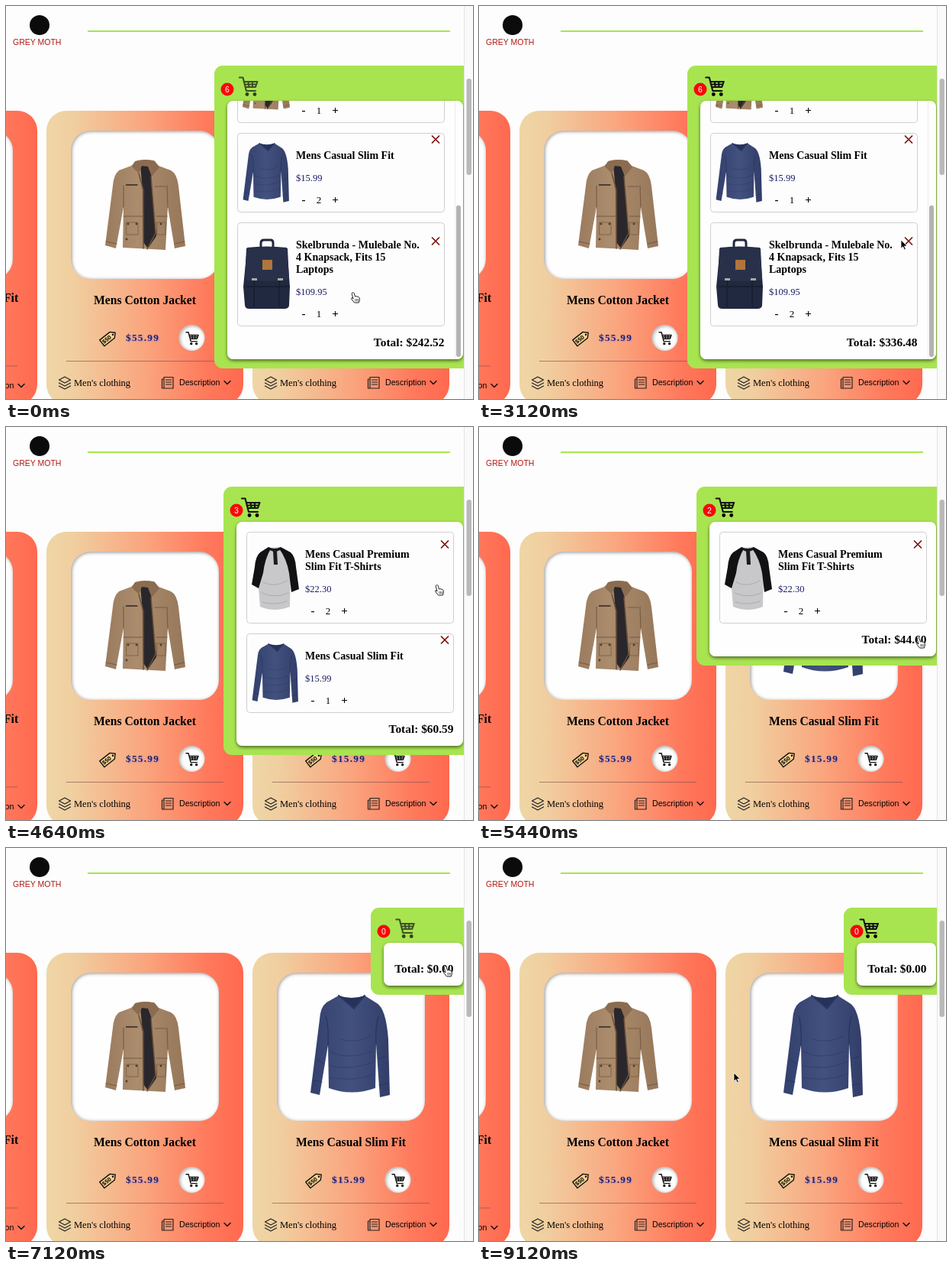
Animation, 612 px wide and 514 px high, one loop 9200 ms. Source, as an HTML page:

```html
<!DOCTYPE html>
<html lang="en">
<head>
<meta charset="utf-8">
<title>Shopping cart</title>
<style>
html, body { margin: 0; width: 100%; height: 100%; overflow: hidden; background: #fdfdfd; }
svg { display: block; width: 612px; height: 514px; }
text { font-family: "Liberation Serif", "Times New Roman", serif; white-space: pre; }
.sans { font-family: "Liberation Sans", Arial, sans-serif; }
.b { font-weight: bold; }
.line { fill: none; stroke: #111; stroke-linecap: round; stroke-linejoin: round; }
</style>
</head>
<body>
<svg id="stage" viewBox="0 0 612 514" xmlns="http://www.w3.org/2000/svg"></svg>
<script>
const LOOP = 9200, STEP = 80;
const stage = document.getElementById('stage');

const text = (x, y, size, str, cls = '', extra = '') =>
  `<text x="${x}" y="${y}" font-size="${size}" class="${cls}" ${extra}>${str}</text>`;
const path = (d, fill, extra = '') => `<path d="${d}" fill="${fill}" ${extra}/>`;
const line = (d, color, width, extra = '') =>
  `<path d="${d}" class="line" style="stroke:${color};stroke-width:${width}" ${extra}/>`;
const use = (id, x, y, scale = 1) =>
  `<use href="#${id}" transform="translate(${x} ${y}) scale(${scale})"/>`;

const shirt =
  path('M38 1L22 10Q14 16 13 32L1 128L13 131L24 66L25 122Q55 133 86 122L87 64L92 134L105 131L103 58Q100 18 88 11L72 1Q55 9 38 1z', 'url(#navy)') +
  path('M38 1Q55 7 72 1L58 18z', '#26325a') +
  line('M38 1L58 18L72 1', '#2b3764', 2) +
  line('M24 66Q25 40 21 28M87 64Q86 40 90 28', '#293560', 1.3) +
  line('M27 74Q48 86 82 74M26 92Q50 100 84 88M27 108Q56 114 84 104M40 58Q60 64 80 54', '#2f3b67', 1.2, 'opacity=".7"') +
  line('M5 112L16 114M91 118L103 116M9 84L18 90M90 84L101 80', '#2a3661', 1);

const jacket =
  path('M40 2L34 8L18 14Q11 20 10 34L0 112L14 116L24 62L23 115L79 118L82 62L91 116L105 113L96 34Q94 18 86 14L70 8L64 1Q52 -1 40 2z', 'url(#tan)') +
  path('M46 7L62 8L60 26L67 100L56 116L50 108L49 40z', '#29272c') +
  path('M39 2Q52 -2 65 2L71 10L61 22L56 9L48 8L44 18L35 9z', '#8c6c50') +
  line('M44 18L50 40L50 116M60 22L66 96L55 117', '#6c503a', 1.5) +
  line('M24 62L24 34M82 62L81 34M1 107L15 110M91 110L104 107M28 33H43M65 35H79M24 74H49M67 74H81', '#765a42', 1.1) +
  line('M28 82H43V98H28zM68 82H79V98H68z', '#806247', 1) +
  path('M27 32h15v2h-15z', '#4b3e35') +
  [[30, 84], [41, 84], [28, 104], [73, 84]].map(([x, y]) => `<circle cx="${x}" cy="${y}" r="1.4" fill="#4d3b2d"/>`).join('');

const tee =
  path('M22 3L14 10L12 34L9 56L11 80Q30 88 50 80L51 34L48 10L38 2z', '#c8c8cb') +
  path('M22 2L11 9Q5 14 4 28L0 51L9 56L15 36Q17 18 25 4zM38 2L51 9Q57 14 58 28L62 57L52 61L49 36Q46 18 36 4z', '#121214') +
  path('M22 2Q30 6 38 2L37 6Q30 10 24 6zM28 7h5l1 18h-5z', '#1b1b1e') +
  line('M15 48Q30 56 46 46M13 62Q30 70 48 62M14 74Q30 79 46 73', '#a9a9ad', .9);

const pack =
  line('M23 12V5Q23 1 27 1H36Q39 1 39 5V12', '#20283e', 3) +
  path('M5 11Q30 8 57 11L61 62L60 87Q59 91 54 91H8Q2 91 2 86L0 62z', '#20293f') +
  path('M4 12Q30 9 58 12L60 53Q30 57 2 53z', '#283149') +
  line('M14 54V88M47 54V88M3 62H60', '#161d2f', 1.3) +
  path('M11 51h7v3h-7zM45 51h7v3h-7z', '#a8a9a8') +
  '<rect x="25" y="27" width="13" height="13" fill="#b0763c"/>';

const cartIcon =
  '<path d="M1.5 2.5H6L10.5 20H22.5M7.5 8H25L22.5 15H9.3M8 11.5H23.5M13 8L14 15M18.5 8V15" class="line" stroke-width="2.1"/>' +
  '<circle cx="11.5" cy="24.5" r="2.4"/><circle cx="21.5" cy="24.5" r="2.4"/>';

const defs = `<defs>
<linearGradient id="peach"><stop offset="0" stop-color="#efd6a6"/><stop offset=".13" stop-color="#f0cfa0"/>
<stop offset=".5" stop-color="#faa57e"/><stop offset=".82" stop-color="#ff795c"/><stop offset="1" stop-color="#ff694f"/></linearGradient>
<linearGradient id="navy"><stop offset="0" stop-color="#33406e"/><stop offset=".5" stop-color="#43517f"/><stop offset="1" stop-color="#323e69"/></linearGradient>
<linearGradient id="tan"><stop offset="0" stop-color="#9b7b5e"/><stop offset=".4" stop-color="#ab8c6d"/><stop offset="1" stop-color="#967759"/></linearGradient>
<filter id="soft" x="-20%" y="-20%" width="140%" height="140%"><feGaussianBlur stdDeviation="2.2"/></filter>
<filter id="drop" x="-20%" y="-20%" width="140%" height="150%"><feDropShadow dx="0" dy="2" stdDeviation="2" flood-opacity=".55"/></filter>
<clipPath id="photo"><rect x="85" y="163" width="194" height="194" rx="26"/></clipPath>
<clipPath id="knob"><circle cx="243.5" cy="434" r="17"/></clipPath>
<clipPath id="page"><rect width="600" height="514"/></clipPath>
<g id="shirt">${shirt}</g><g id="jacket">${jacket}</g><g id="tee">${tee}</g><g id="pack">${pack}</g>
<g id="cart">${cartIcon}</g>
<g id="tag"><path d="M-11 -5H6L11 0L6 5H-11z" class="line" style="fill:#f7d08c" stroke-width="1.4"/>
<circle cx="7" cy="0" r="1.2"/>${text(-9.5, 2.6, 7.5, '$50', 'sans b')}</g>
</defs>`;

// Shop cards are laid out in the middle card's coordinates and shifted.
function card(dx, title, price, pic, shift = 0) {
  return `<g transform="translate(${dx} 0)">
<rect x="53" y="137" width="258" height="384" rx="26" fill="url(#peach)"/>
<g clip-path="url(#photo)"><rect x="85" y="163" width="194" height="194" fill="#fefefe"/>
<rect x="84" y="162" width="198" height="198" rx="27" fill="none" stroke="#333" stroke-opacity=".6" stroke-width="4" filter="url(#soft)"/></g>
${pic}${title}
<g transform="translate(134.5 434) rotate(-38)"><use href="#tag"/></g>
${text(157, 438, 13.2, price, 'b', 'fill="#1c2266" letter-spacing="1.3" style="text-shadow:1px 1px 2px #b58ac8"')}
<circle cx="243.5" cy="434" r="17" fill="#fefefe"/>
<g clip-path="url(#knob)"><circle cx="244.5" cy="435" r="18.5" fill="none" stroke="#333" stroke-opacity=".6" stroke-width="3" filter="url(#soft)"/></g>
${use('cart', 235, 425, .68)}
<path d="M79 ${464.5 + shift * 1.6}H285" stroke="#7a4a48" stroke-opacity=".6"/>
<g transform="translate(0 ${shift})">
${line('M69.5 489L77 485L84.5 489L77 493zM69.5 493L77 497L84.5 493M69.5 497L77 501L84.5 497', '#222', 1.2)}
${text(89, 497, 12.5, "Men's clothing")}
${line('M207 485.5H219V500H207zM207 488H204.5V500H207M209.5 489H216.5M209.5 492H216.5M209.5 495H216.5', '#222', 1.2)}
${text(227, 496, 10.67, 'Description', 'sans')}
${line('M286 490.5L290 494.5L294 490.5', '#111', 1.5)}
</g></g>`;
}

const heading = str => text(182, 390, 15.67, str, 'b', 'text-anchor="middle"');

const hand = path('M2 1Q3.5 0 4.2 1.6L5.4 6L7 5.6L8.4 6.1L10 6.4L11.3 8V11L10.3 14H4.5L1 9.5Q0 8 1 7.6L3 8.8L1.2 2.6Q1 1.4 2 1z', '#fff',
  'stroke="#222" stroke-width="1" stroke-linejoin="round"') + line('M5.8 9.4V12M7.6 9.4V12M9.3 9.4V12', '#222', .7);
const arrow = path('M0 0V11.2L2.6 8.8L4.4 12.8L6.3 12L4.5 8.1H8z', '#000', 'stroke="#fff" stroke-width=".8"');

stage.innerHTML = defs + `
<rect width="612" height="514" fill="#fdfdfd"/>
<circle cx="44" cy="25" r="13" fill="#0b0b0b"/>
${text(9, 51, 10.5, 'GREY MOTH', 'sans', 'fill="#b01a12"')}
<path d="M107 33H582" stroke="#a5e84b" stroke-width="2"/>
<g clip-path="url(#page)">
${card(-270, text(267, 387, 15.67, 'Fit', 'b'), '$22.30', '', 4)}
${card(0, heading('Mens Cotton Jacket'), '$55.99', use('jacket', 130, 201))}
${card(270, heading('Mens Casual Slim Fit'), '$15.99', use('shirt', 128, 192))}
<g id="panel"></g>
</g>
<rect x="600" width="12" height="514" fill="#fafafa"/>
<path d="M600.5 0V514" stroke="#e4e4e4"/>
<rect x="603.5" y="95" width="6.5" height="126" rx="3.2" fill="#b9b9b9"/>
<g id="pointer"><g id="hand">${hand}</g><g id="arrow">${arrow}</g></g>`;

const goods = [
  { name: ['Mens Casual Premium', 'Slim Fit T-Shirts'], price: 22.30, pic: y => use('tee', 7, y + 18) },
  { name: ['Mens Cotton Jacket'], price: 55.99, pic: y => use('jacket', 7, y + 17, .59) },
  { name: ['Mens Casual Slim Fit'], price: 15.99, pic: y => use('shirt', 7, y + 13, .58) },
  { name: ['Skelbrunda - Mulebale No.', '4 Knapsack, Fits 15', 'Laptops'], price: 109.95, pic: y => use('pack', 8, y + 22) }
];

// Quantities per product from a given time on.
const changes = [
  [0, [2, 1, 2, 1]], [960, [2, 1, 2, 2]], [2480, [2, 1, 1, 2]], [3520, [2, 1, 1, 0]],
  [4320, [2, 0, 1, 0]], [5440, [2, 0, 0, 0]], [6640, [0, 0, 0, 0]]
];

const height = item => 88 + 16 * item.name.length;

function row(item, qty, y) {
  const n = item.name.length, shift = 16 * (n - 1), cross = y + 8.5 + 8 * (n - 1);
  return `<rect x=".5" y="${y + .5}" width="271" height="${height(item) - 1}" rx="4" fill="#fdfdfd" stroke="#cfcfcf"/>` +
    item.pic(y) +
    item.name.map((s, i) => text(77, y + 33.5 + 16 * i, 14, s, 'b')).join('') +
    text(77, y + 62.5 + shift, 12.5, '$' + item.price.toFixed(2), '', 'fill="#1b1b68"') +
    text(87, y + 91.5 + shift, 15, '-', 'b', 'text-anchor="middle"') +
    text(107, y + 91.5 + shift, 13, qty, '', 'text-anchor="middle"') +
    text(128.5, y + 92 + shift, 15, '+', 'b', 'text-anchor="middle"') +
    line(`M255.5 ${cross - 4.5}L264.5 ${cross + 4.5}M264.5 ${cross - 4.5}L255.5 ${cross + 4.5}`, '#7b0d0a', 1.7);
}

function drawPanel(counts) {
  const top = 124, view = 338;
  const rows = goods.map((item, i) => ({ item, qty: counts[i] })).filter(r => r.qty);
  const full = Math.max(56, rows.reduce((h, r) => h + height(r.item) + 13, 43));
  const h = Math.min(full, view), scrolls = full > view;
  const left = !rows.length ? 478 : scrolls ? 273 : 285;
  const total = rows.reduce((s, r) => s + r.qty * r.item.price, 0);
  const pieces = rows.reduce((s, r) => s + r.qty, 0);
  const box = `x="${left + 17}" y="${top}" width="${582 - left}" height="${h}" rx="8"`;
  let y = top + 13 - (full - h), list = '';
  for (const r of rows) {
    list += row(r.item, r.qty, y);
    y += height(r.item) + 13;
  }
  const thumb = view * view / full - 6;
  document.getElementById('panel').innerHTML = `
<clipPath id="inner"><rect ${box}/></clipPath>
<rect x="${left}" y="78" width="${640 - left}" height="${h + 58}" rx="11" fill="#a8e450"/>
<rect ${box} fill="#fefefe" filter="url(#drop)"/>
<g clip-path="url(#inner)"><g transform="translate(${left + 30} 0)">${list}</g>
${text(scrolls ? 574.5 : 586.5, top + h - 17, 15.4, 'Total: $' + total.toFixed(2), 'b', 'text-anchor="end"')}
${scrolls ? `<path d="M588.5 ${top}V${top + h}" stroke="#ececec"/><rect x="590" y="${459 - thumb}" width="6" height="${thumb}" rx="3" fill="#b3b3b3"/>` : ''}</g>
<g id="trolley"><use href="#cart"/></g>
<circle cx="${left + 17}" cy="109" r="8.5" fill="#f80606"/>
${text(left + 17, 112.8, 10.5, pieces, 'sans', 'fill="#fff" text-anchor="middle"')}`;
  return left;
}

// Pointer stops: time, x, y.
const stops = [
  [0, 452, 374], [640, 430, 399], [1200, 430, 399], [1600, 389, 399], [1840, 389, 399],
  [2240, 389, 249], [2640, 389, 249], [3120, 553, 306], [3360, 562, 304], [3760, 562, 304],
  [4080, 562, 206], [4720, 562, 206], [5200, 573, 275], [5600, 573, 275], [6160, 572, 167],
  [6480, 573, 154], [7200, 573, 154], [7760, 470, 224], [8480, 334, 294], [9200, 334, 294]
];
const ease = u => u * u * (3 - 2 * u);

function pointerAt(t) {
  const i = stops.findIndex(s => s[0] > t);
  const [a, b] = [stops[i - 1], stops[i]];
  const u = ease((t - a[0]) / (b[0] - a[0]));
  return [a[1] + (b[1] - a[1]) * u, a[2] + (b[2] - a[2]) * u];
}

// The trolley rocks and fades while the panel is hovered, then rests.
function trolleyAt(t) {
  const rock = 22.5 + 5.25 * (1 - Math.cos(2 * Math.PI * (t - 140) / 375));
  const rest = ease(Math.min(1, Math.max(0, (t - 7360) / 240)));
  return rock + (20 - rock) * rest;
}

const pointer = document.getElementById('pointer');
let shown = null, left = 0;

function render(t) {
  const counts = changes.filter(c => c[0] <= t).pop()[1];
  if (counts !== shown) {
    left = drawPanel(counts);
    shown = counts;
  }
  const off = trolleyAt(t), trolley = document.getElementById('trolley');
  trolley.setAttribute('transform', `translate(${left + off} 91)`);
  trolley.setAttribute('opacity', 1 - Math.max(0, off - 24) * .04);
  const [x, y] = pointerAt(t), isArrow = t > 7360 || (t >= 2880 && t < 3280);
  pointer.setAttribute('transform', `translate(${x} ${y})`);
  document.getElementById('hand').style.display = isArrow ? 'none' : '';
  document.getElementById('arrow').style.display = isArrow ? '' : 'none';
}

const start = performance.now();
function tick() {
  const t = (performance.now() - start) % LOOP;
  render(Math.floor(t / STEP) * STEP);
  requestAnimationFrame(tick);
}
tick();
</script>
</body>
</html>
```
